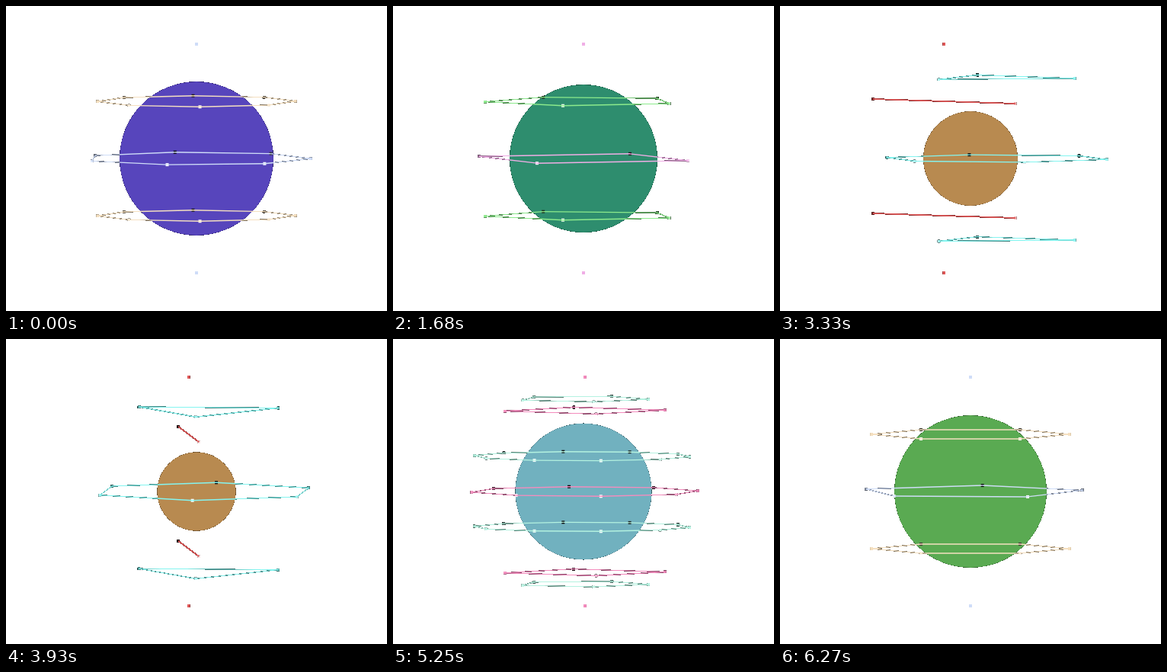
Animation, 500 px wide and 400 px high, one loop 6.3 s. Source, as an HTML page with a canvas:

```html
<!DOCTYPE html>
<html>
<head>
<meta charset="utf-8">
<title>Counter-rotating spheres</title>
<style>
html, body { margin: 0; width: 500px; height: 400px; overflow: hidden; background: #fff; }
canvas { display: block; }
</style>
</head>
<body>
<canvas id="stage" width="500" height="400"></canvas>
<script>
const ctx = document.getElementById('stage').getContext('2d', { willReadFrequently: true });
const RADIUS = 150, STEP = 30, COUNT = 210, CUTOFF = 0.46;
const sin = deg => Math.sin(deg * Math.PI / 180);
const cos = deg => Math.cos(deg * Math.PI / 180);

// Each stage lasts until its `end` step
const stages = [
  { end: 30,  bands: 2, sides: 7, disc: '#5745bc', a: [207, 221, 248], b: [245, 224, 192] },
  { end: 60,  bands: 2, sides: 4, disc: '#2e8d6e', a: [240, 174, 230], b: [140, 235, 140] },
  { end: 90,  bands: 3, sides: 2, disc: '#802346', a: [176, 128, 235], b: [188, 240, 120] },
  { end: 135, bands: 3, sides: 2, disc: '#b88a50', a: [224, 88, 88],   b: [132, 245, 240] },
  { end: 165, bands: 7, sides: 3, disc: '#4a6aa5', a: [242, 148, 210], b: [174, 242, 204] },
  { end: 180, bands: 4, sides: 4, disc: '#71b1bf', a: [244, 140, 190], b: [180, 242, 224] },
  { end: 211, bands: 2, sides: 5, disc: '#5aaa52', a: [207, 221, 248], b: [245, 224, 192] }
];

const rgb = c => `rgb(${c.map(Math.round)})`;

// Depth from -1 (back, black) to 1 (front, white)
const shade = (color, depth) =>
  rgb(color.map(v => depth > 0 ? v + (255 - v) * depth : v * (1 + depth)));

function drawRing(cx, cy, r, sides, spin, tilt, color) {
  const pts = Array.from({ length: sides }, (_, j) => {
    const angle = spin + j * 360 / sides, z = r * sin(angle);
    return { x: cx + r * cos(angle), y: cy + z * tilt, depth: z / RADIUS };
  });
  for (const p of pts) {
    ctx.fillStyle = shade(color, p.depth);
    ctx.fillRect(p.x - 2, p.y - 2, 4, 4);
  }
  if (sides < 2) return;
  ctx.strokeStyle = rgb(color);
  pts.forEach((p, j) => {
    const q = pts[(j + 1) % sides];
    ctx.beginPath();
    ctx.moveTo(p.x, p.y);
    ctx.lineTo(q.x, q.y);
    ctx.stroke();
  });
}

function drawSphere(cx, first, last, bands, sides, spin, tilt, color) {
  for (let i = first; i <= last; i++) {
    const lat = 180 * i / bands;
    const n = Math.max(1, sides * Math.min(i, bands - i));
    drawRing(cx, 200 - RADIUS * cos(lat), RADIUS * sin(lat), n, spin, tilt, color);
  }
}

// Soft pixels become either clear or solid, darkened by their coverage
function hardenEdges() {
  const img = ctx.getImageData(0, 0, 500, 400), d = img.data;
  for (let i = 0; i < d.length; i += 4) {
    const alpha = d[i + 3] / 255;
    if (alpha === 1 || alpha === 0) continue;
    const solid = alpha >= CUTOFF;
    for (let c = 0; c < 3; c++) d[i + c] *= alpha;
    d[i + 3] = solid ? 255 : 0;
  }
  ctx.putImageData(img, 0, 0);
}

function draw(n) {
  const { bands, sides, disc, a, b } = stages.find(s => n < s.end);
  const apart = n >= 90 && n < 180 ? sin(2 * (n - 90)) : 0;
  const shift = 50 * apart * sin(4 * (n - 90));
  const tilt = (8 + 4 * sin(6 * n)) / RADIUS;

  ctx.clearRect(0, 0, 500, 400);
  ctx.fillStyle = disc;
  ctx.beginPath();
  ctx.arc(250, 200, (100 + 5 * sin(12 * n)) * (1 - apart / 2), 0, 2 * Math.PI);
  ctx.fill();

  ctx.lineWidth = 1.4;
  drawSphere(250 - shift, 0, bands, bands, sides, 2 * n, tilt, a);
  drawSphere(250 + shift, 1, bands, bands + 1, sides + 1, -2 * n, tilt, b);
  hardenEdges();
}

const start = performance.now();
let shown = 0;
function tick() {
  const n = Math.floor((performance.now() - start) / STEP) % COUNT + 1;
  if (n !== shown) draw(shown = n);
  requestAnimationFrame(tick);
}
tick();
</script>
</body>
</html>
```
